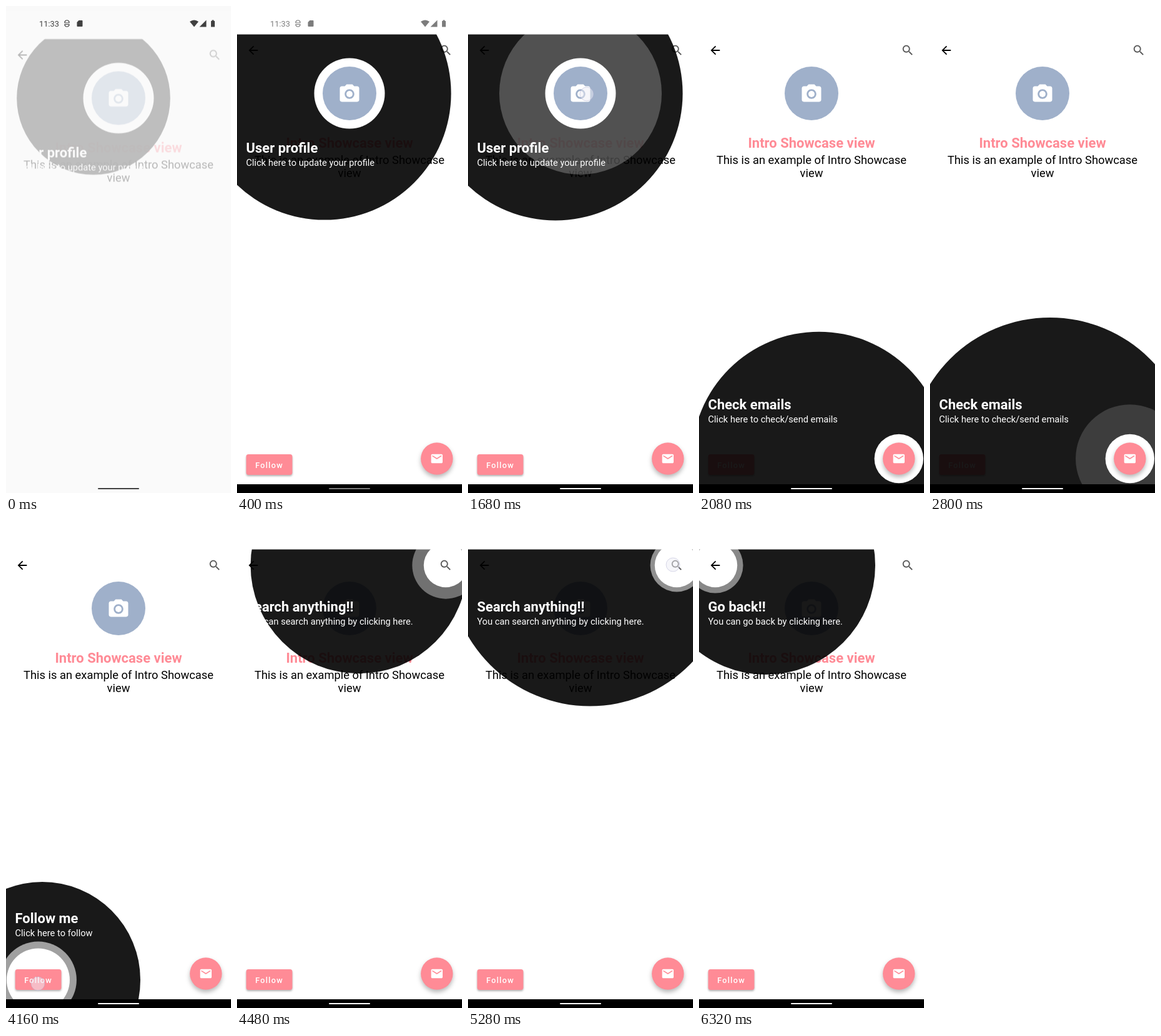
Write an HTML page that moves like this. It is 360x780 px and loops after 6400 ms.

```html
<!DOCTYPE html>
<html lang="en">
<head>
<meta charset="utf-8">
<title>Intro showcase</title>
<style>
  html, body { margin: 0; width: 100%; height: 100%; overflow: hidden; background: #f9f9f9; }
  svg { display: block; width: 360px; height: 780px; font-family: Roboto, sans-serif; }
  .bold { font-size: 22px; font-weight: 700; }
  .sub { font-size: 18.33px; }
  .body { font-size: 14.66px; }
  .mid { text-anchor: middle; }
  .pink { fill: #ff8b96; }
  .white { fill: #fff; }
  .button { font-size: 12.83px; font-weight: 500; letter-spacing: 1.15px; }
  #follow { filter: drop-shadow(0 2px 1.5px rgba(0, 0, 0, .3)); }
  #fab { filter: drop-shadow(0 4px 3.5px rgba(0, 0, 0, .28)); }
</style>
</head>
<body>
<svg viewBox="0 0 360 780">
  <mask id="cutout" maskUnits="userSpaceOnUse" x="0" y="0" width="360" height="780">
    <rect class="white" width="360" height="780"/>
    <circle id="hole"/>
  </mask>

  <g id="app">
    <rect class="white" width="360" height="780"/>
    <path transform="translate(15 60) scale(.917)" d="M20 11H7.83l5.59-5.59L12 4l-8 8 8 8 1.41-1.41L7.83 13H20v-2z"/>
    <path transform="translate(323 60) scale(.917)" fill="#585858" d="M15.5 14h-.79l-.28-.27C15.41 12.59 16 11.11 16 9.5 16 5.91 13.09 3 9.5 3S3 5.91 3 9.5 5.91 16 9.5 16c1.61 0 3.09-.59 4.23-1.57l.27.28v.79l5 4.99L20.49 19l-4.99-5zm-6 0C7.01 14 5 11.99 5 9.5S7.01 5 9.5 5 14 7.01 14 9.5 11.99 14 9.5 14z"/>
    <circle cx="180" cy="140" r="43" fill="#9fb0ca"/>
    <g class="white" transform="translate(161.4 122.4) scale(1.55)">
      <circle cx="12" cy="12" r="3.2"/>
      <path d="M9 2L7.17 4H4c-1.1 0-2 .9-2 2v12c0 1.1.9 2 2 2h16c1.1 0 2-.9 2-2V6c0-1.1-.9-2-2-2h-3.17L15 2H9zm3 15c-2.76 0-5-2.24-5-5s2.24-5 5-5 5 2.24 5 5-2.24 5-5 5z"/>
    </g>
    <text class="bold pink mid" x="180" y="227">Intro Showcase view</text>
    <text class="sub mid" x="180" y="252.5">This is an example of Intro Showcase</text>
    <text class="sub mid" x="180" y="274">view</text>

    <g id="actions">
      <g id="follow">
        <rect class="pink" x="14.7" y="718" width="73.8" height="33" rx="3.7"/>
      </g>
      <text class="button white" x="29.3" y="739.5">Follow</text>
      <circle id="fab" class="pink" cx="319.8" cy="725" r="25.7"/>
      <path class="white" transform="translate(308.8 714) scale(.917)" d="M20 4H4c-1.1 0-1.99.9-1.99 2L2 18c0 1.1.9 2 2 2h16c1.1 0 2-.9 2-2V6c0-1.1-.9-2-2-2zm0 4l-8 5-8-5V6l8 5 8-5v2z"/>
    </g>

    <g mask="url(#cutout)">
      <circle id="disc" opacity=".9"/>
      <circle class="ripple white"/>
      <circle class="ripple white"/>
    </g>
    <text id="heading" class="bold white" x="14.5"></text>
    <text id="hint" class="body white" x="14.5"></text>
    <rect class="white" width="360" height="45.5"/>
  </g>

  <rect id="nav" y="766" width="360" height="14"/>
  <g id="system">
    <rect x="147" y="772" width="66" height="2" rx="1"/>
    <text x="53" y="32.6" font-size="12.8">11:33</text>
    <path fill="none" stroke="currentColor" stroke-width="1.2" d="M94 27v-2l2-2h3l2 2v2zM94 29.500h7v1.500l-2 2h-3l-2-2z"/>
    <path d="M116.500 23h5q1 0 1 1v8q0 1-1 1h-7q-1 0-1-1v-6z"/>
    <path d="M294 25q7-5 14 0l-7 8.500zM309.500 33.500h11v-11zM328 24h1.500v-1.500h3V24h1.500v9.500h-6z"/>
  </g>
  <circle id="touch" r="11" fill="rgba(238,238,246,.5)" stroke="rgba(150,150,195,.35)"/>
</svg>

<script>
const LOOP = 6400, STEP = 80;

// target centre and size, disc centre and radius, heading baseline, touch point and time
const stages = [
  { start: -30, x: 180, y: 140, size: 86, discX: 140, radius: 203.5, base: 234.5,
    heading: 'User profile', hint: 'Click here to update your profile', touch: [190, 141, 1600] },
  { start: 1840, x: 319.8, y: 725, size: 51.4, discX: 192, radius: 226, base: 645.5,
    heading: 'Check emails', hint: 'Click here to check/send emails', touch: [320, 727, 3040] },
  { start: 3200, x: 51.5, y: 735, size: 74, discX: 58, radius: 157, base: 643.5,
    heading: 'Follow me', hint: 'Click here to follow', touch: [51, 741, 4100] },
  { start: 4320, x: 334, y: 71, size: 43.5, discX: 195, radius: 225.5, base: 144.5,
    heading: 'Search anything!!', hint: 'You can search anything by clicking here.', touch: [328, 70, 5200] },
  { start: 5440, x: 26, y: 71, size: 43.5, discX: 107, radius: 175, base: 144.5,
    heading: 'Go back!!', hint: 'You can go back by clicking here.' }
];

const $ = id => document.getElementById(id);
const ripples = document.querySelectorAll('.ripple');
const clamp = v => Math.min(1, Math.max(0, v));
const set = (el, attrs) => { for (const k in attrs) el.setAttribute(k, attrs[k]); };

function bezier(x1, y1, x2, y2) {
  const at = (a, b, s) => 3 * a * s * (1 - s) ** 2 + 3 * b * s * s * (1 - s) + s ** 3;
  return x => {
    let lo = 0, hi = 1;
    for (let i = 0; i < 24; i++) {
      const mid = (lo + hi) / 2;
      if (at(x1, x2, mid) < x) lo = mid; else hi = mid;
    }
    return at(y1, y2, lo);
  };
}
const fastOutSlowIn = bezier(.4, 0, .2, 1);
const fastOutLinearIn = bezier(.4, 0, 1, 1);

function drawShowcase(t) {
  const s = stages.findLast(stage => t >= stage.start);
  const grow = .6 + .4 * fastOutSlowIn(clamp((t - s.start) / 500));
  set($('disc'), { cx: s.discX, cy: s.y, r: s.radius * grow });
  set($('hole'), { cx: s.x, cy: s.y, r: s.size / 2 + 13.5 });
  ripples.forEach((el, i) => {
    const age = Math.max(0, t - i * 1000);
    const p = fastOutLinearIn(age / 2000 % 1);
    set(el, { cx: s.x, cy: s.y, r: s.size * 2 * p, opacity: 1 - p });
  });
  $('heading').textContent = s.heading;
  $('hint').textContent = s.hint;
  set($('heading'), { y: s.base });
  set($('hint'), { y: s.base + 21.5 });

  const [x, y, down] = s.touch || [0, 0, Infinity];
  set($('touch'), { cx: x, cy: y, opacity: t >= down ? 1 : 0 });
}

function drawSystem(t) {
  const slide = 7.5 * (1 - clamp(t / 320)) ** 3;
  const reveal = clamp((t - 20) / 140);
  const shade = Math.round(64 + 191 * clamp((t - 200) / 640));
  const tint = `rgb(${shade},${shade},${shade})`;
  set($('app'), { transform: `translate(0 ${slide})`, opacity: clamp(.26 + t / 180) });
  set($('actions'), { opacity: reveal });
  set($('nav'), { opacity: reveal });
  set($('system'), { fill: tint, color: tint });
}

function frame() {
  const t = Math.floor(performance.now() % LOOP / STEP) * STEP;
  drawShowcase(t);
  drawSystem(t);
  requestAnimationFrame(frame);
}
frame();
</script>
</body>
</html>
```
